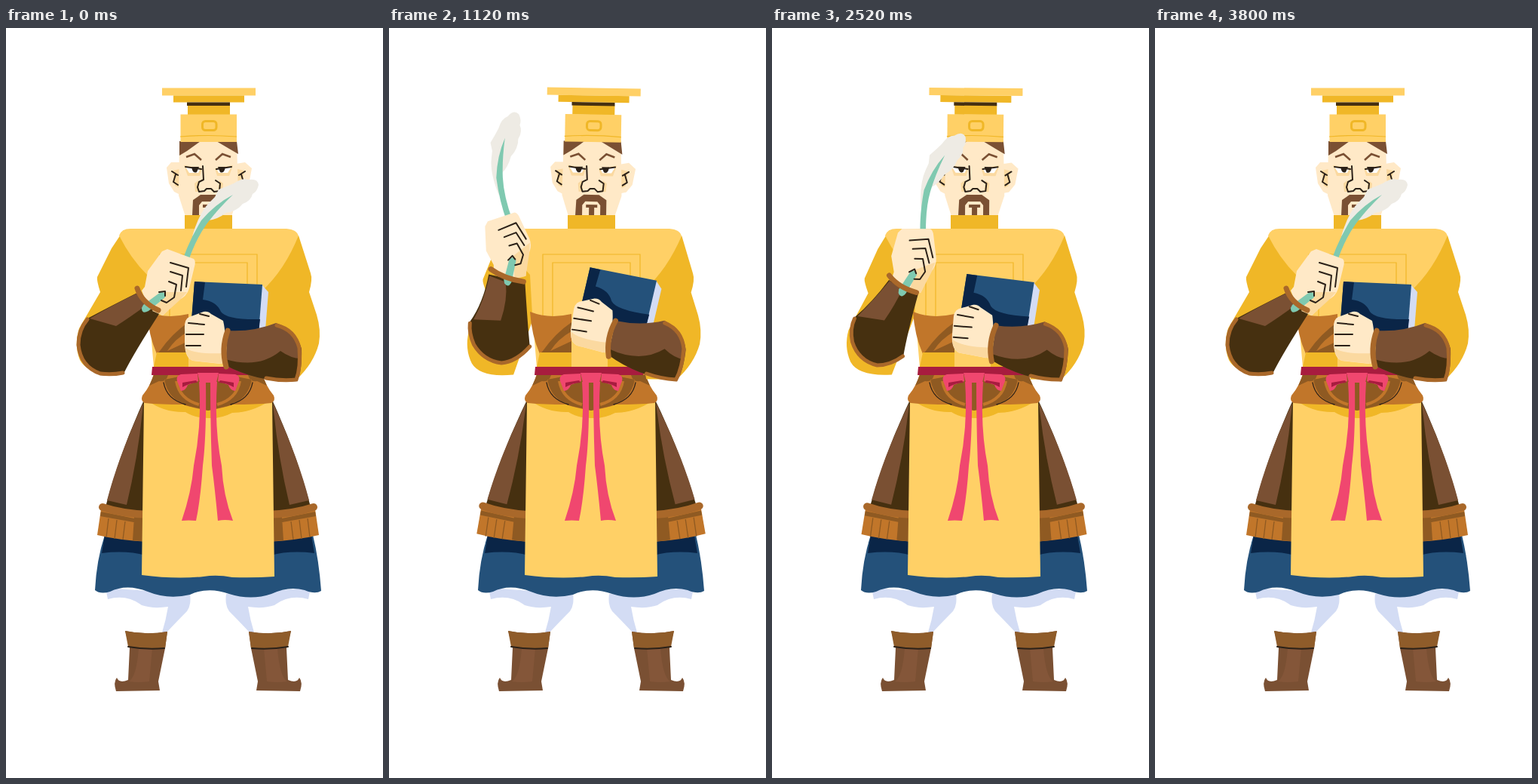
Write an HTML page that moves like this. It is 500 px wide and 994 px high and loops after 3.84 s.

```html
<!DOCTYPE html>
<html lang="en">
<head>
<meta charset="utf-8">
<title>Scholar with quill</title>
<style>
  html, body { margin: 0; width: 100%; height: 100%; overflow: hidden; background: #fff; }
  svg { display: block; width: 100vw; height: 100vh; }
  .gold { fill: #ffd066; } .amber { fill: #f0b727; }
  .skin { fill: #ffe9c7; } .tan { fill: #fbd9a0; }
  .brown { fill: #7a5033; } .dark { fill: #463010; }
  .rust { fill: #c1762a; } .umber { fill: #8f5a22; }
  .blue { fill: #24517a; } .navy { fill: #0a2547; }
  .mist { fill: #d3dcf4; } .pink { fill: #f0476f; } .wine { fill: #a81c3f; }
  .mint { fill: #7fc9b0; } .vane { fill: #eeebe4; }
  .line { fill: none; stroke: #2b2118; stroke-width: 2; stroke-linecap: round; stroke-linejoin: round; }
  .trim { fill: none; stroke: #f0b727; stroke-width: 1.2; }
  .rim { fill: none; stroke: #a9682a; stroke-width: 7; stroke-linecap: round; }
</style>
</head>
<body>
<svg viewBox="0 0 500 994">
  <g id="leg">
    <path class="mist" d="M132 742L135 757Q160 750 180 765Q195 770 215 767Q212 785 207 801L213 801Q228 785 240 773Q246 765 244 750Z"/>
    <path class="brown" d="M158 799Q185 805 214 800L211 822L202 866L204 878L146 879Q142 867 147 861Q150 869 162 864L164 822Z"/>
    <path fill="#845639" d="M176 822H194L190 866Q176 868 163 866Q173 860 176 822Z"/>
    <path fill="#8f5c2a" d="M158 799Q185 805 214 800L211 822Q185 824 162 820Z"/>
    <path class="line" d="M162 820Q185 824 210 822"/>
  </g>
  <use href="#leg" transform="matrix(-1 0 0 1 536 0)"/>

  <path class="blue" d="M131 672H407Q415 705 418 746Q410 751 396 745Q375 739 352 750Q325 759 296 750Q268 740 244 751Q215 758 188 747Q160 736 138 747Q125 751 118 745Q120 705 131 672Z"/>
  <g id="flank">
    <path class="navy" d="M131 672H185V699Q160 692 127 696Z"/>
    <g id="panel">
      <path class="dark" d="M183 493Q150 565 131 638L190 648V493Z"/>
      <path class="brown" d="M182 497Q150 565 134 626L160 632Q176 565 182 497Z"/>
      <path class="rust" d="M126 638L190 650V681Q150 679 121 672Z"/>
      <path class="umber" d="M170 648H190V681L168 679ZM126 641L175 651V656L125 647Z"/>
      <path d="M136 650L133 675M147 652L144 677M158 654L155 678" stroke="#8f5a22" stroke-width="1.3"/>
      <path class="rim" style="stroke-width:10" d="M128 635Q155 644 190 645"/>
    </g>
  </g>
  <use href="#flank" transform="matrix(-1 0 0 1 536 0)"/>

  <path class="gold" d="M183 494H353L356 727Q330 729 300 728Q280 724 262 727Q225 731 180 725Z"/>
  <path class="amber" d="M188 494H350Q325 510 300 510Q285 518 268 517Q250 517 238 509Q210 510 188 494Z"/>
  <g id="hip">
    <path class="rust" d="M196 458H268V507Q245 503 235 499Q205 499 184 497Q178 494 181 487Q192 474 196 458Z"/>
    <path class="umber" d="M196 460H215Q212 470 203 468L190 474ZM210 466Q215 493 242 501L268 507V460H240Z"/>
    <path fill="none" stroke="#c1762a" stroke-width="4" d="M226 468Q230 492 256 499"/>
    <path class="line" style="stroke-width:1.3" d="M209 470Q213 492 238 499"/>
  </g>
  <use href="#hip" transform="matrix(-1 0 0 1 536 0)"/>

  <path id="nearSleeve" class="amber" d="M156 268L140 292L121 330Q120 334 125 350L97 398Q90 420 98 440Q108 460 152 459L190 372V300Z"/>
  <path class="gold" d="M150 275Q153 266 165 266H372Q386 267 388 276Q380 320 340 350L338 450H196L190 380L187 327Q165 305 150 275Z"/>
  <path class="trim" d="M204 385V300H333V390M217 385V311H320V390"/>
  <path class="rust" d="M187 376Q212 386 242 379V432H200Q189 407 187 376Z"/>
  <path class="umber" d="M242 390Q220 405 204 428L200 432H242V415L214 428Q224 412 242 402Z"/>
  <path class="amber" d="M200 430H242V449H196ZM290 430H338V449H290Z"/>
  <path class="wine" d="M194 449H337V460H193Z"/>
  <g id="bow">
    <path class="pink" d="M254 458L232 459Q225 461 227 468L232 481Q239 480 241 473L255 468Z"/>
    <path class="wine" d="M252 467L234 470V476Q244 470 254 470Z"/>
  </g>
  <use href="#bow" transform="matrix(-1 0 0 1 536 0)"/>
  <path class="pink" d="M254 457H282L279 470H257ZM256 469H265Q266 540 261 580Q258 625 252 653Q242 652 233 653Q246 615 249 580Q260 525 256 469ZM271 469H280Q276 530 286 580Q288 620 301 653Q290 651 281 653Q277 610 273 580Q271 525 271 469Z"/>

  <g id="head">
    <path class="skin" d="M231 178L219 178L213 185L216 206L223 217L231 221ZM305 180L317 178L326 186L322 207L314 217L305 219Z"/>
    <path class="tan" d="M230 187L221 189L224 209L230 212ZM307 187L316 189L313 209L307 212Z"/>
    <path class="line" d="M220 190L228 195M225 194L222 204L228 208M317 190L309 195M312 194L315 204L309 208"/>
    <path class="skin" d="M230 150H306L308 222L299 250H238L229 222Z"/>
    <path class="brown" d="M230 150H258L240 163L230 169ZM279 150H306L308 167L296 160Z"/>
    <path fill="none" stroke="#7a5033" stroke-width="2.6" d="M239 171L250 167L259 175M298 171L287 167L278 175"/>
    <path class="tan" d="M236 182L260 186L257 196H241ZM301 182L277 186L280 196H296ZM255 202L250 206L251 217H257ZM283 202L288 206L287 217H281Z"/>
    <path fill="#fff" d="M238 184L258 186L255 192H243ZM299 184L279 186L282 192H294Z"/>
    <path fill="#2b2118" d="M246 184H256L253 191Q249 193 247 188ZM291 184H281L284 191Q288 193 290 188Z"/>
    <path class="line" d="M238 184L259 187M299 184L279 187M261 183L262 201L256 204L254 211L256 217L263 216L266 213H272L276 217L283 216L284 206L278 202"/>
    <path class="brown" d="M247 249L248 228L258 221H278L288 228V249H280V235L276 230H260L256 235V249ZM261 234H276V238H272V249H265V238H261Z"/>
    <path class="gold" d="M207 79.500H331V89.500H207Z"/>
    <path class="amber" d="M222 89.500H316V98.500H222ZM241 102H297V115H241Z"/>
    <path class="dark" d="M240 98.500H297V103H240Z"/>
    <path class="gold" d="M231.500 114.500H306V151H231.500Z"/>
    <path class="trim" d="M231 144Q268 141 306 144"/>
    <rect class="trim" style="stroke-width:3" x="260.500" y="123.500" width="18.500" height="12" rx="4"/>
  </g>
  <path class="amber" d="M237 248H300V266H237Z"/>

  <path id="farSleeve" class="amber" d="M388 275L404 325Q407 333 402 350L412 380Q418 400 415 418Q408 445 385 466H345L335 400L340 348Q370 320 388 275Z"/>

  <g id="bookArm">
    <path class="mist" d="M339 340L348 350L344 400H333Z"/>
    <path class="blue" d="M250 336L340 340L335 404L245 400Z"/>
    <path class="navy" d="M250 336L264 337L261 360Q279 362 285 376Q293 387 337 386L335 404L245 400Z"/>
    <path class="brown" d="M294 401Q328 403 358 391Q385 400 392 425Q393 455 386 468Q335 470 291 447Z"/>
    <path class="dark" d="M291 439Q335 452 364 428Q378 438 391 438L386 468Q335 470 291 447Z"/>
    <path class="rim" style="stroke-width:5" d="M359 394Q383 400 389 424Q391 450 385 466Q365 468 345 464"/>
    <path class="skin" d="M237 400Q236 386 243 383L262 376Q268 375 272 379L288 388Q292 405 292 440L284 445L248 441Q238 438 237 420Z"/>
    <path class="tan" d="M238 424Q250 433 291 431L287 445L248 441Q239 438 238 424Z"/>
    <path class="line" d="M257 379L269 382M242 391L263 393M239 406H262M239 421H258"/>
    <path class="rim" d="M294 401Q285 425 292 449"/>
  </g>

  <g id="quillArm">
    <path id="forearm" class="dark"/>
    <path id="light" class="brown"/>
    <path id="elbow" class="rim" style="stroke-width:5"/>
    <g id="hand">
      <path class="vane" d="M247 276Q256 245 270 231L277 224L282 214Q293 210 302 206Q313 198 322 201Q334 199 335 208Q333 217 327 220Q325 229 314 233Q306 243 292 245Q280 254 268 255Q256 268 247 276Z"/>
      <path class="mint" d="M230 322Q238 290 259 255Q278 233 301 221Q280 241 266 260Q250 282 238 320Z"/>
      <path class="skin" d="M184 343L188 322L207 296L214 293L249 306Q252 309 250 316L243 345Q240 356 228 361L208 381Q188 372 180 348Z"/>
      <path class="tan" d="M212 350L240 350L230 361L208 381L194 375Z"/>
      <path class="mint" d="M182 367L205 350Q212 349 211 357L189 375Q180 380 180 371Z"/>
      <path class="line" d="M218 311L242 318L239 343M218 323L234 328L232 348M216 336L226 340L223 357L213 364L206 361M203 350L211 349V355"/>
    </g>
    <path id="wrist" class="rim"/>
  </g>
</svg>
<script>
const $ = id => document.getElementById(id);
const LOOP = 3840, HALF = 1680;

// Lowered and raised outlines of the parts that bend
const bends = {
  forearm: ["M176 350Q140 368 108 385Q94 400 95 420Q98 450 125 460Q140 462 156 458Q170 430 205 376Z",
            "M130 326Q124 365 107 390Q105 405 112 420Q125 442 150 446Q170 443 188 422Q184 390 179 336Z"],
  light:   ["M177 350Q140 368 111 385L146 395Q165 383 188 366Z",
            "M131 328Q125 362 112 387L148 388Q157 360 153 336Z"],
  elbow:   ["M108 386Q96 400 96 420Q99 449 125 458Q140 460 155 457",
            "M107 392Q106 405 113 420Q126 441 150 444Q170 442 188 421"],
  wrist:   ["M174 345Q180 364 202 374", "M133 319Q150 331 177 335"]
};

const lerp = (a, b, p) => a + (b - a) * p;
const ease = u => u < .5 ? 32 * u ** 6 : 1 - 32 * (1 - u) ** 6;

function blend([from, to], p) {
  const ends = to.match(/\d+/g);
  let i = 0;
  return from.replace(/\d+/g, n => lerp(+n, +ends[i++], p).toFixed(2));
}

const move = (id, transform) => $(id).setAttribute("transform", transform);
const turn = (id, angle, x, y) => move(id, `rotate(${angle} ${x} ${y})`);

function pose(p) {
  turn("head", p, 268, 250);
  turn("panel", 1.6 * p, 183, 495);
  turn("nearSleeve", -4.5 * p, 165, 285);
  turn("farSleeve", 1.3 * p, 380, 285);
  turn("bookArm", 9 * p, 383, 437);
  for (const id in bends) $(id).setAttribute("d", blend(bends[id], p));
  move("hand", `translate(${-38 * p} ${-36 * p}) rotate(${-40.5 * p} 188 359)`);
  const arc = 4 * Math.sin(Math.PI * p);
  move("quillArm", `translate(${arc / 2} ${-arc})`);
}

function draw(now) {
  const t = Math.floor(now % LOOP / 40) * 40;
  pose(ease(Math.max(0, 1 - Math.abs(t - HALF) / HALF)));
  requestAnimationFrame(draw);
}
draw(performance.now());
</script>
</body>
</html>
```
